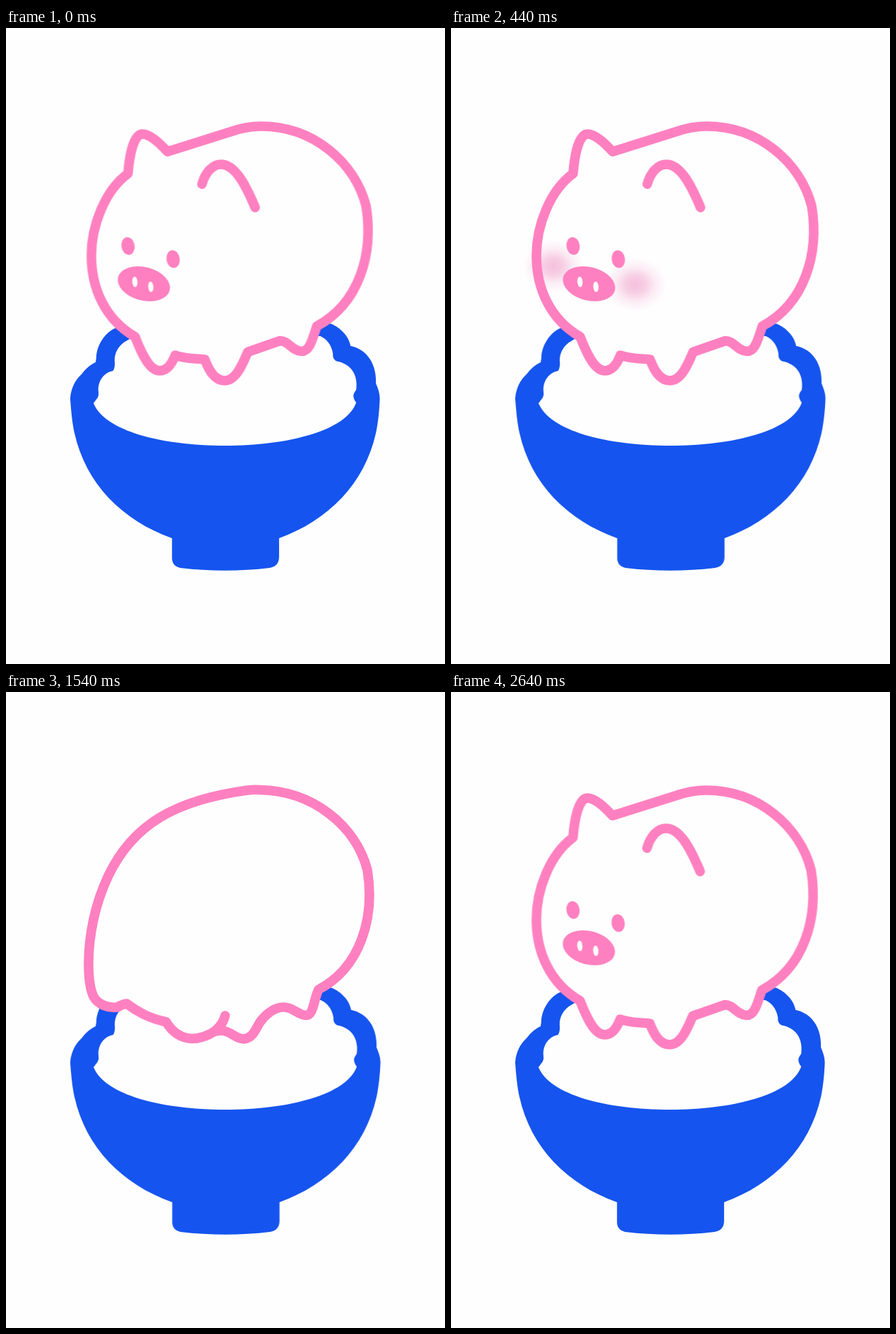
Animation of 622 by 900 pixels, one loop 2860 ms. Source, as an HTML page:

```html
<!DOCTYPE html>
<html lang="en">
<head>
<meta charset="utf-8">
<title>Pig on a rice bowl</title>
<style>
  :root { --paper: #fefefe; --pink: #ff80c0; --blue: #1554ee; }
  html, body { margin: 0; width: 100%; height: 100%; overflow: hidden; background: var(--paper); }
  svg { display: block; width: 100%; height: 100%; }

  .bowl { fill: var(--blue); }
  .paper { fill: var(--paper); }
  .pink { fill: var(--pink); }
  .line { fill: none; stroke: var(--pink); stroke-width: 13.6; stroke-linecap: round; stroke-linejoin: round; }

  .scene, .pose, .blush { animation: 2860ms step-end infinite; }
  .scene { transform-origin: 91px 0; animation-name: settle; }
  .standing { animation-name: standing; }
  .leaning { animation-name: leaning; }
  .turned { animation-name: turned; }
  .blush { animation-name: blush; }

  @keyframes settle {
    0%, 92.308% { transform: scaleX(.998); }
    7.692%, 84.615% { transform: none; }
  }
  @keyframes standing {
    0%, 92.308%, 100% { opacity: 1; }
    46.154% { opacity: 0; }
  }
  @keyframes leaning {
    0%, 53.846%, 92.308%, 100% { opacity: 0; }
    46.154%, 84.615% { opacity: 1; }
  }
  @keyframes turned {
    0%, 84.615%, 100% { opacity: 0; }
    53.846% { opacity: 1; }
  }
  @keyframes blush {
    0%, 53.846%, 100% { opacity: 0; }
    7.692% { opacity: .5; }
    15.385% { opacity: 1; }
  }
</style>
</head>
<body>
<svg viewBox="0 0 622 900">
  <defs>
    <radialGradient id="glow">
      <stop offset="0" stop-color="#f0a0ca" stop-opacity=".66"/>
      <stop offset=".3" stop-color="#f0a0ca" stop-opacity=".52"/>
      <stop offset=".65" stop-color="#f0a0ca" stop-opacity=".18"/>
      <stop offset="1" stop-color="#f0a0ca" stop-opacity="0"/>
    </radialGradient>

    <path id="standing-body" d="M173 206C175 180 181 151 193 150C204 150 217 162 229 175
      L318 147C335 141 350 139 362 139C436 139 495 190 511 252C522 320 501 390 441 422
      C435 440 431 458 419 457.500C406 457 401 443 389 442.500L343 458.500
      C334 480 325 499 310 499C296 499 288 485 282 469L262 467.500Q248 466 240 463
      C235 476 228 485 218 485C203 485 192 460 183 437C140 412 121 368 121 322
      C121 280 140 230 173 206Z"/>

    <path id="leaning-body" d="M129 283C121 269 112.500 256 112.500 243C112.500 226 130 219 164 219
      C188 201 215 185 240 175L318 147C335 141 350 139 364 139
      C438 139 496 190 512 252C523 320 502 390 442 421
      C438 440 434 458 421 457.500C408 457 402 444 391 442.500L346 458.500
      C337 480 327 499 312 499C298 499 291 486 285 470L247 465
      C245 481 240 493 229 493C212 493 198 470 185 455C140 422 122 372 122 330
      C122 312 125 298 129 283Z"/>

    <path id="turned-body" d="M117 385C117 345 126 300 145 260C180 187 240 153 342 139
      C350 138 355 138 360 138.500C436 140 496 190 512 252C523 320 502 390 443 421
      C436 434 436 458 425 457.500C413 457 408 446 393 446C380 446 367 457 360 467
      C354 476 350 490 337 491C325 491 319 480 306 479L296 480
      C285 487 275 490.500 264 490.500C248 490 236 482 227 467
      C205 462 190 455 171 441Q164 442 158 446C145 448 130 442 124 431C119 420 117 405 117 385Z"/>

    <g id="eyes" class="pink">
      <ellipse rx="9.400" ry="12.600" transform="translate(173 308.500) rotate(-8)"/>
      <ellipse rx="9.400" ry="12.600" transform="translate(237 327) rotate(-8)"/>
    </g>
    <g id="snout">
      <ellipse class="pink" rx="37.800" ry="23.600" transform="translate(195.500 362) rotate(14)"/>
      <ellipse class="paper" rx="3.700" ry="7.500" transform="translate(182.700 359.300) rotate(-4)"/>
      <ellipse class="paper" rx="3.700" ry="7.500" transform="translate(205.300 366.200) rotate(-4)"/>
    </g>
    <g id="cheeks" fill="url(#glow)">
      <ellipse cx="145" cy="337" rx="43" ry="37"/>
      <ellipse cx="261" cy="363" rx="44" ry="38"/>
    </g>
  </defs>

  <g class="scene">
    <path class="bowl" d="M91 524C92 510 98 498 107 490C113 482 119 477 127 473L128 467
      C128 450 140 430 157 424L300 400L461 418.500C475 424 487 437 489 450
      C513 455 526 476 525 503C528 510 530.500 517 530.500 524C530 540 528 560 525 573
      C509 645 457 697 387.500 722V749Q387 762 374 764Q311 771.500 247 764Q235 761 235.500 749V722
      C165 697 113 645 97 573C94 560 92 540 91 524Z"/>
    <path class="paper" d="M124 531C140 570 220 591 311 591C400 591 483 570 497 530
      Q494 527 493 521Q493 517 497 512C500 490 489 475 469 471.500Q463 468 464 461
      C462 448 455 440 446 436H185Q176 439 167 445C159 451 154 460 154 470
      Q155 480 152 485C138 488 130 500 131 514Q132 519 130 523Z"/>

    <g class="pose standing">
      <use href="#standing-body" class="paper"/>
      <use href="#cheeks" class="blush"/>
      <use href="#standing-body" class="line"/>
      <path class="line" d="M278 221C283 203 294 193 305 193C325 193 340 222 353.500 254"/>
      <use href="#eyes"/>
      <use href="#snout"/>
    </g>

    <g class="pose leaning">
      <use href="#leaning-body" class="paper"/>
      <g transform="translate(0 41)"><use href="#cheeks" class="blush"/></g>
      <use href="#leaning-body" class="line"/>
      <path class="line" d="M247.500 271C251 262 258 256 267 256C282 256 293 272 304 290"/>
      <use href="#eyes" transform="translate(-2 42.500)"/>
      <use href="#snout" transform="translate(.5 39.800)"/>
    </g>

    <g class="pose turned">
      <use href="#turned-body" class="paper"/>
      <use href="#turned-body" class="line"/>
      <path class="line" d="M296 480C303 474 308 468 310.500 458"/>
    </g>
  </g>
</svg>
</body>
</html>
```
